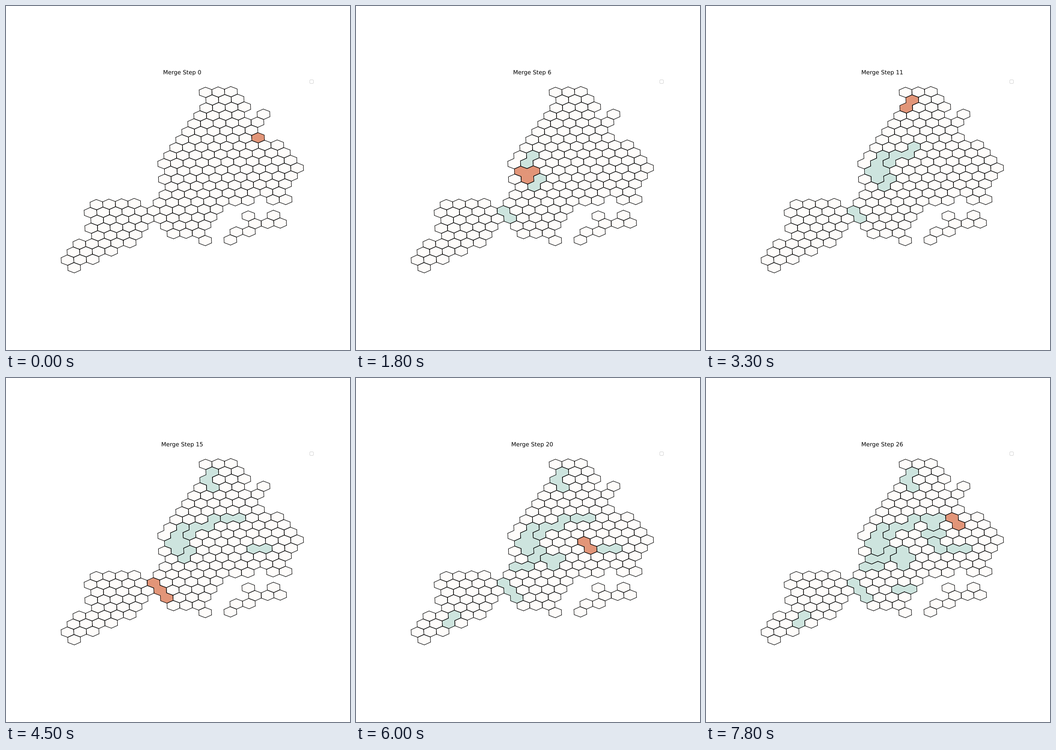
Animation, 748 px wide and 748 px high, one loop 8000 ms. Source, as a matplotlib script:

```python
import math

import numpy as np
import matplotlib.pyplot as plt
from matplotlib.animation import FuncAnimation
from matplotlib.collections import LineCollection, PolyCollection
from matplotlib.patheffects import Normal

SIZE, DPI = 748, 74.8
PLAIN, MERGED, ACTIVE = "#fefcfa", "#cde4de", "#e29578"
STEP_MS, TICK_MS, LOOP_MS = 300, 100, 8000

# Flat lattice in pixels: cell (row, col) sits at ORIGIN + row * DOWN + col * RIGHT.
ORIGIN = np.array([433.80, 187.83])
RIGHT = np.array([27.444, -0.757])
DOWN = np.array([-13.029, 17.316])
CENTRE = np.array([383.35, 377.74])
CURVATURE, COS_LATITUDE = 2.25e-5, 0.716

COMPASS = {"E": (0, 1), "SE": (1, 1), "SW": (1, 0),
           "W": (0, -1), "NW": (-1, -1), "NE": (-1, 0)}
SIDES = list(COMPASS.values())

# Key (row, col) points of the west and east coast of each land.
LANDS = [
    ([(0, 0), (1, 1), (9, 1), (10, 2), (11, 2), (12, 3), (15, 3), (18, 6)],
     [(0, 2), (2, 4), (3, 4), (4, 6), (5, 6), (6, 7), (7, 9), (10, 12),
      (13, 12), (15, 8), (18, 8)]),
    ([(14, -2), (15, -2), (16, -1), (17, -1), (18, 0), (19, -1), (21, -1), (22, 0)],
     [(14, 1), (16, 3), (19, 3), (22, 0)]),
]
ISLETS = [(3, 6), (14, 12), (14, 13), (19, 9), (16, 11), (16, 13),
          (17, 12), (17, 13), (17, 14), (18, 11), (18, 12), (19, 11)]

# Start cell, walk from it, and the step at which each move joins its two cells.
TRAILS = [
    ((8, 1), "SW", [1]),
    ((15, 3), "SE SE", [2, 15]),
    ((8, 2), "SW SW SE NE", [3, 7, 5, 6]),
    ((11, 4), "SW W", [4, 25]),
    ((7, 4), "SW W SW", [10, 8, 9]),
    ((1, 1), "SW SE", [11, 12]),
    ((11, 9), "E", [13]),
    ((7, 5), "E SW", [14, 22]),
    ((13, 6), "NE W NE", [17, 16, 21]),
    ((19, 1), "SW", [18]),
    ((13, 3), "E", [19]),
    ((10, 7), "SE", [20]),
    ((9, 6), "E", [23]),
    ((16, 7), "E", [24]),
    ((7, 7), "SE", [26]),
]
FIRST_PICK = (6, 7)


def shift(cell, move):
    return cell[0] + move[0], cell[1] + move[1]


def offset(cell):
    return cell[0] * DOWN + cell[1] * RIGHT


def land_cells(west, east):
    for row in range(west[0][0], west[-1][0] + 1):
        first = np.interp(row, *zip(*west))
        last = np.interp(row, *zip(*east))
        for col in range(math.ceil(first - 1e-6), math.floor(last + 1e-6) + 1):
            yield row, col


def project(points):
    """Bend the flat lattice the way longitude and latitude do."""
    dx, dy = (points - CENTRE).T
    bend = CURVATURE * np.array([-dx * dy, (COS_LATITUDE * dx) ** 2 / 2])
    return points + bend.T


def collect_joins():
    joins = {0: (FIRST_PICK, FIRST_PICK)}
    for cell, walk, steps in TRAILS:
        for move, step in zip(walk.split(), steps):
            after = shift(cell, COMPASS[move])
            joins[step] = (cell, after)
            cell = after
    return joins


CELLS = sorted({c for land in LANDS for c in land_cells(*land)} | set(ISLETS))
CORNERS = np.array([(offset(SIDES[k]) + offset(SIDES[(k + 1) % 6])) / 3
                    for k in range(6)])
HEXES = {cell: project(ORIGIN + offset(cell) + CORNERS) for cell in CELLS}
JOINS = collect_joins()
LAST_STEP = max(JOINS)


def regions_at(step):
    """Map every cell to a region label after the given step."""
    label = {cell: cell for cell in CELLS}
    for k in range(step + 1):
        new, old = (label[cell] for cell in JOINS[k])
        label = {cell: new if reg == old else reg for cell, reg in label.items()}
    return label


def colours(label, step):
    # The very first join goes back to plain once it is no longer active.
    grown = {label[JOINS[k][0]] for k in range(2, step + 1)}
    active = label[JOINS[step][0]]
    return [ACTIVE if label[cell] == active
            else MERGED if label[cell] in grown else PLAIN for cell in CELLS]


def borders(label):
    """Cell sides that separate two regions or face the outside."""
    return [(HEXES[cell][k - 1], HEXES[cell][k])
            for cell in CELLS for k, move in enumerate(SIDES)
            if label.get(shift(cell, move)) != label[cell]]


fig = plt.figure(figsize=(SIZE / DPI, SIZE / DPI), dpi=DPI, facecolor="white")
left, right, top, bottom = 93.5, 673.2, 154.8, 600.7
ax = fig.add_axes([left / SIZE, 1 - bottom / SIZE,
                   (right - left) / SIZE, (bottom - top) / SIZE])
ax.set_xlim(left, right)
ax.set_ylim(bottom, top)
ax.axis("off")
ax.legend(handles=[], labels=[], loc="upper right")
title = ax.set_title("", fontsize=12, fontname="DejaVu Sans",
                     path_effects=[Normal()])
fills = ax.add_collection(
    PolyCollection(list(HEXES.values()), linewidths=0.5), autolim=False)
lines = ax.add_collection(
    LineCollection([], colors="black", linewidths=1, capstyle="round"),
    autolim=False)


def draw(tick):
    step = min(tick * TICK_MS // STEP_MS, LAST_STEP)
    label = regions_at(step)
    shades = colours(label, step)
    fills.set_facecolor(shades)
    fills.set_edgecolor(shades)
    lines.set_segments(borders(label))
    title.set_text(f"Merge Step {step}")
    return fills, lines, title


anim = FuncAnimation(fig, draw, frames=LOOP_MS // TICK_MS, interval=TICK_MS,
                     init_func=lambda: draw(0), repeat=True, repeat_delay=0)
plt.show()
```
